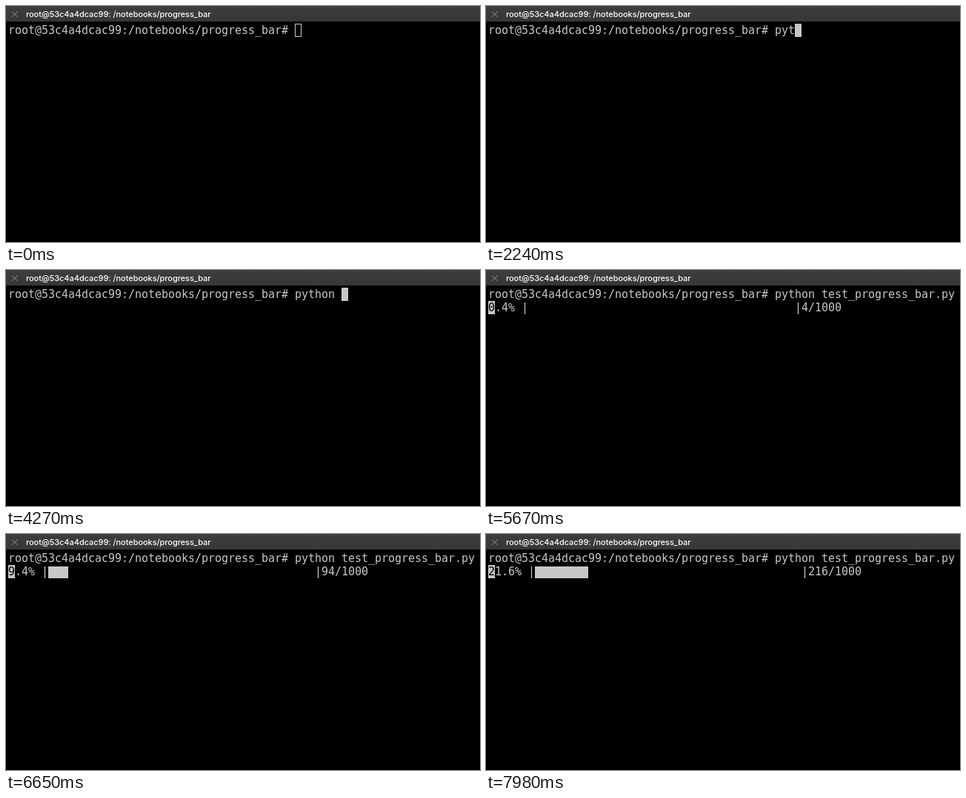
An HTML page for the animation above (8 s loop, 640x320 px).

```html
<!DOCTYPE html>
<html lang="en">
<head>
<meta charset="utf-8">
<title>Terminal progress bar</title>
<style>
  html, body { margin: 0; width: 100%; height: 100%; overflow: hidden; background: #000; }
  svg { display: block; width: 640px; height: 320px; }
  .mono { font: 15px "DejaVu Sans Mono", monospace; fill: #c7c7c7; white-space: pre; }
  .title { font: 500 11px Inter, sans-serif; letter-spacing: -.05px; fill: #fff; }
</style>
</head>
<body>
<svg viewBox="0 0 640 320">
  <defs>
    <linearGradient id="chrome" x2="0" y2="1">
      <stop offset="0" stop-color="#3d3d3d"/>
      <stop offset="1" stop-color="#373737"/>
    </linearGradient>
  </defs>
  <rect width="640" height="320"/>
  <rect width="640" height="21" fill="url(#chrome)"/>
  <path d="M8 7.5l7.5 7.5M15.5 7.5l-7.5 7.5" stroke="#929292" fill="none"/>
  <text class="title" x="27" y="15">root@53c4a4dcac99: /notebooks/progress_bar</text>
  <rect id="cursor" stroke="#c7c7c7"/>
  <rect id="fill" y="44" height="16" fill="#c7c7c7"/>
  <text id="command" class="mono" y="38"></text>
  <text id="status" class="mono" y="56"></text>
  <text id="under" class="mono" y="56" style="fill:#000"></text>
</svg>
<script>
const LOOP = 8000, CELL = 9, LEFT = 3, TOP = 24, LINE = 18;
const PROMPT = 'root@53c4a4dcac99:/notebooks/progress_bar# ';
const COMMAND = 'python test_progress_bar.py';
const KEYS = [1750, 1960, 2240, 3290, 3430, 3570, 3850, 4760, 4900];
const FOCUS = 910, COMPLETE = 5040, RUN = 5670, TICK = 70;
const BAR = 40, TOTAL = 1000;
const COUNTS = [[0, 4], [7, 48], [22, 146], [33, 216]];

const $ = id => document.getElementById(id);
const colX = col => LEFT + col * CELL;

function set(el, attrs) {
  for (const name in attrs) el.setAttribute(name, attrs[name]);
}

// Places each character in its terminal cell.
function print(el, text) {
  if (el.textContent === text) return;
  el.textContent = text;
  el.setAttribute('x', [...text].map((_, i) => colX(i)).join(' '));
}

function countAt(step) {
  let i = 1;
  while (i < COUNTS.length - 1 && step > COUNTS[i][0]) i++;
  const [a, from] = COUNTS[i - 1], [b, to] = COUNTS[i];
  return Math.round(from + (to - from) * (step - a) / (b - a));
}

function drawCursor(col, row, solid) {
  set($('cursor'), {
    x: colX(col) + .5, y: TOP + row * LINE + .5,
    width: CELL - 1, height: LINE - 1,
    fill: solid ? '#c7c7c7' : 'none'
  });
}

function render(t) {
  const typed = t >= COMPLETE ? COMMAND.length : KEYS.filter(k => t >= k).length;
  print($('command'), PROMPT + COMMAND.slice(0, typed));

  const running = t >= RUN;
  $('cursor').style.display = t >= COMPLETE && !running ? 'none' : '';
  drawCursor(running ? 0 : PROMPT.length + typed, running ? 1 : 0, t >= FOCUS);

  let status = '', blocks = 0, start = 0;
  if (running) {
    const n = countAt(Math.floor((t - RUN) / TICK));
    const head = (n / TOTAL * 100).toFixed(1) + '% |';
    status = head + ' '.repeat(BAR) + '|' + n + '/' + TOTAL;
    blocks = Math.floor(n / TOTAL * BAR);
    start = head.length;
  }
  print($('status'), status);
  print($('under'), status.slice(0, 1));
  set($('fill'), { x: colX(start), width: blocks * CELL });
}

function loop() {
  render(performance.now() % LOOP);
  requestAnimationFrame(loop);
}
loop();
</script>
</body>
</html>
```
